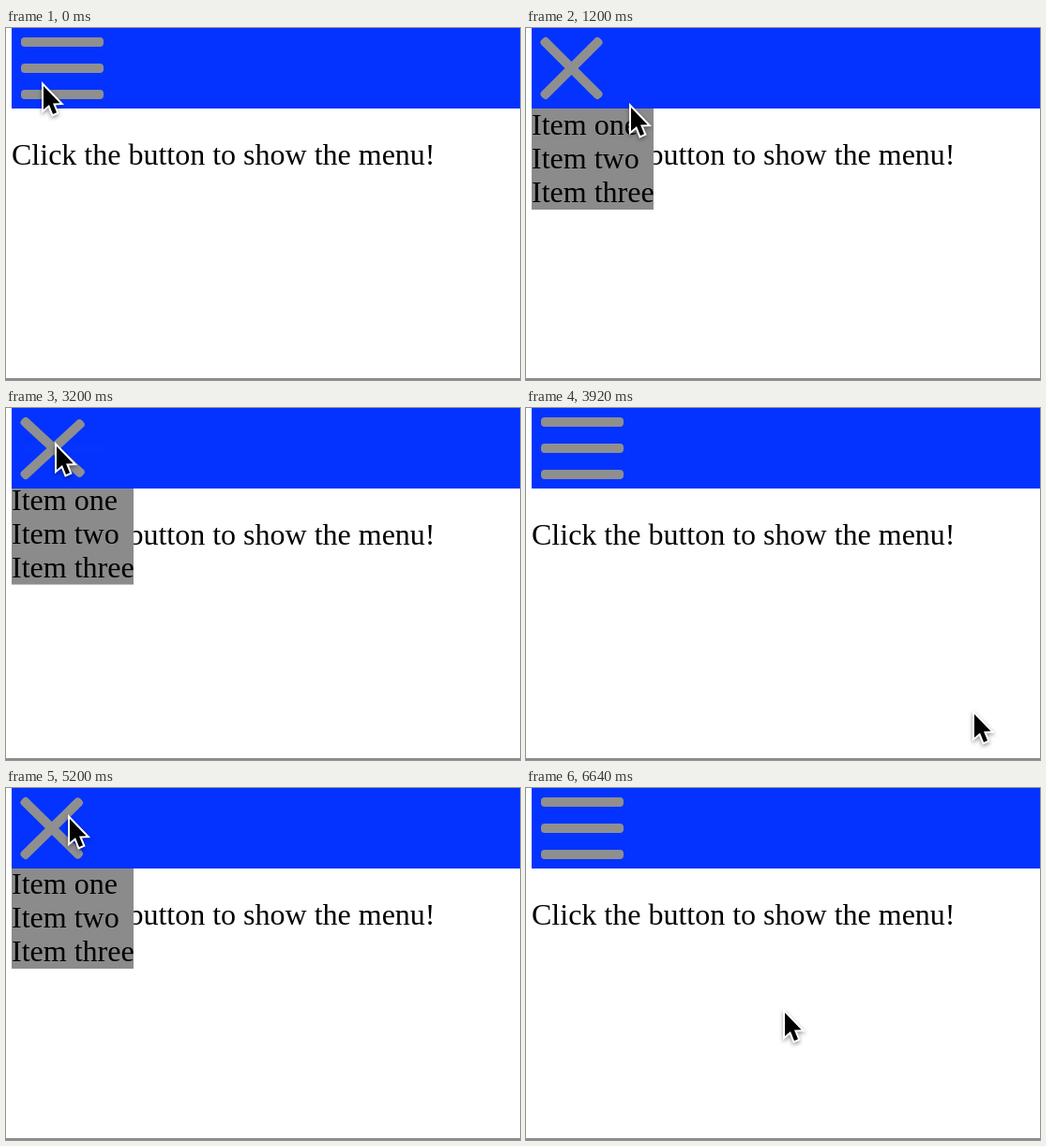
An HTML page that plays this animation: 548x376 px, repeating every 6.72 s.

```html
<!DOCTYPE html>
<html lang="en">
<head>
<meta charset="utf-8">
<title>Hamburger menu</title>
<style>
  html, body { margin: 0; width: 100%; height: 100%; overflow: hidden; background: #fff; }
  svg { display: block; width: 548px; height: 376px; }
  text { font: 32px "Liberation Serif", Times, serif; }
  #cursor { filter: drop-shadow(0 2px 2px rgba(0, 0, 0, .4)); }
</style>
</head>
<body>
<svg viewBox="0 0 548 376">
  <text x="6" y="146">Click the button to show the menu!</text>
  <g id="menu">
    <rect x="6" y="86" width="130" height="108" fill="#8b8b8b"/>
    <text x="6" y="114">Item one</text>
    <text x="6" y="150">Item two</text>
    <text x="6" y="186">Item three</text>
  </g>
  <rect x="6" width="542" height="86" fill="#0433ff"/>
  <g fill="#8f8f8f">
    <rect id="top" y="-5" width="88" height="10" rx="4"/>
    <rect id="middle" x="16" y="38" width="88" height="10" rx="4"/>
    <rect id="bottom" y="-5" width="88" height="10" rx="4"/>
  </g>
  <rect y="374" width="548" height="2" fill="#8c8c8c"/>
  <path id="cursor" d="M0 0V25L6 20L10 30L14 28.3L10 18.6L17.5 18.3Z"
    fill="#000" stroke="#fff" stroke-width="4" paint-order="stroke"/>
</svg>
<script>
const LOOP = 6720, TICK = 80, DURATION = 760, MENU_HEIGHT = 108;

// Each click toggles the menu, which starts closed
const clicks = [200, 1400, 2240, 3080, 4493, 5880];

// Pointer: where it starts, then straight moves
const home = { x: 40, y: 62 };
const moves = [
  { from: 160, to: 240, x: 37, y: 55 },
  { from: 1120, to: 1200, x: 112, y: 85 },
  { from: 1200, to: 1360, x: 276, y: 240 },
  { from: 1760, to: 2160, x: 48, y: 65 },
  { from: 2800, to: 2960, x: 54, y: 41 },
  { from: 3680, to: 3920, x: 478, y: 327 },
  { from: 4240, to: 4560, x: 68, y: 33 },
  { from: 5360, to: 5680, x: 276, y: 240 }
];

// The screen does not refresh during this span
const stall = { from: 3520, to: 3760 };

const $ = id => document.getElementById(id);
const place = (id, transform) => $(id).setAttribute('transform', transform);
const progress = (t, from, to) => Math.min(1, Math.max(0, (t - from) / (to - from)));
const mix = (a, b, p) => a + (b - a) * p;

// CSS ease-in-out: cubic-bezier(.42, 0, .58, 1)
function easeInOut(x) {
  let lo = 0, hi = 1;
  for (let i = 0; i < 24; i++) {
    const u = (lo + hi) / 2, v = 1 - u;
    if (1.26 * u * v * v + 1.74 * u * u * v + u ** 3 < x) lo = u; else hi = u;
  }
  return lo * lo * (3 - 2 * lo);
}

function openness(t) {
  return clicks.reduce((open, click, i) =>
    mix(open, 1 - i % 2, easeInOut(progress(t, click, click + DURATION))), 0);
}

function pointerAt(t) {
  return moves.reduce((at, move) => {
    const p = progress(t, move.from, move.to);
    return { x: mix(at.x, move.x, p), y: mix(at.y, move.y, p) };
  }, home);
}

function draw(t) {
  const open = openness(t);
  place('menu', `translate(0 ${MENU_HEIGHT * (open - 1)})`);
  const barX = 16 + 1.4 * open, shift = 3.1 * open, angle = 45 * open;
  place('top', `translate(${barX} ${15 - shift}) rotate(${angle})`);
  place('bottom', `translate(${barX} ${71 + shift}) rotate(${-angle})`);
  $('middle').setAttribute('opacity', (1 - open) ** 2);
  const { x, y } = pointerAt(t);
  place('cursor', `translate(${x} ${y})`);
}

const start = performance.now();
function frame() {
  const t = Math.floor((performance.now() - start) % LOOP / TICK) * TICK;
  draw(t > stall.from && t < stall.to ? stall.from : t);
  requestAnimationFrame(frame);
}
frame();
</script>
</body>
</html>
```
